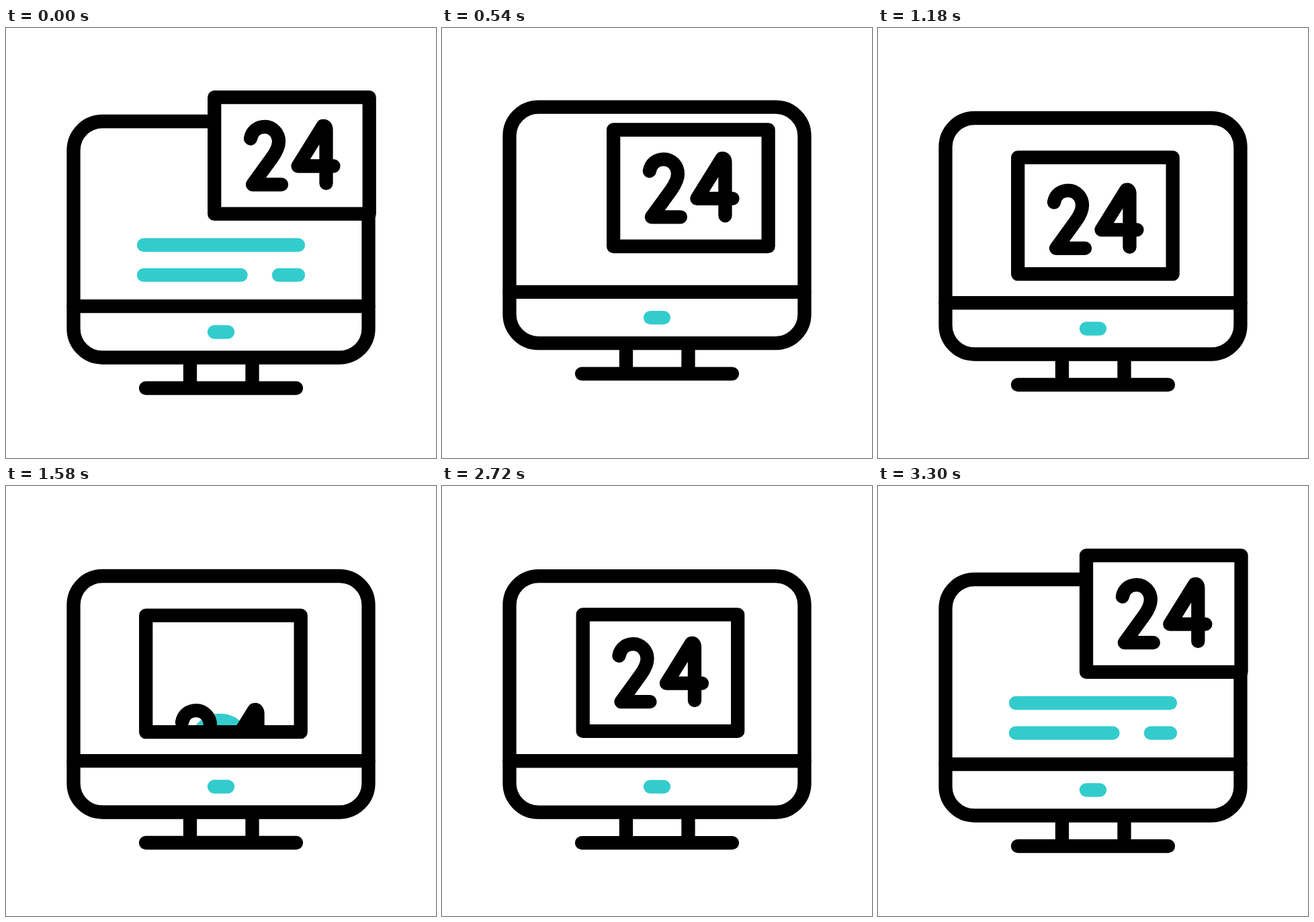
Animation, 640 px wide and 640 px high, one loop 3560 ms. Source, as an HTML page:

```html
<!DOCTYPE html>
<html lang="en">
<head>
<meta charset="utf-8">
<title>Monitor, 24</title>
<style>
  html, body { margin: 0; width: 100%; height: 100%; overflow: hidden; background: #fff; }
  svg { display: block; width: 100%; height: 100%; }
  .ink, .teal { fill: none; stroke: #000; stroke-width: 20.3; stroke-linecap: round; stroke-linejoin: round; }
  .teal { stroke: #3cc; }
</style>
</head>
<body>
<svg viewBox="0 0 640 640">
  <defs>
    <clipPath id="window"><rect x="310" y="103" width="230.5" height="173.5"/></clipPath>
    <g id="rays"></g>
  </defs>

  <g id="monitor" class="ink">
    <path d="M274 491V536M366.5 491V536M208 536H432"/>
    <rect x="100.5" y="139" width="439" height="351.5" rx="43" fill="#fff"/>
    <path d="M100.5 414.2H539.5"/>
    <path class="teal" d="M310 452.5H330"/>
    <g id="textLines" class="teal"></g>
  </g>

  <g id="burst" class="teal">
    <use href="#rays"/>
    <use href="#rays" transform="matrix(-1 0 0 1 651 0)"/>
  </g>

  <g id="card" class="ink">
    <rect x="310.2" y="103.2" width="230.5" height="173.5" fill="#fff" stroke="none"/>
    <g clip-path="url(#window)">
      <g id="person" class="teal">
        <rect x="384.5" y="138" width="72" height="84.5" rx="36"/>
        <path d="M378 300V265A42.5 42.5 0 0 1 463 265V300"/>
      </g>
      <g id="digits">
        <path d="M364 164.5C366 153 375 147 385 147C397 147 406 157 406 169C406 178 401 186 396 193L367 233H410"/>
        <path d="M487.5 205.5H434.5L471.5 146Q476.5 145 476.5 152V231"/>
      </g>
    </g>
    <rect x="310.2" y="103.2" width="230.5" height="173.5"/>
  </g>
</svg>

<script>
const LOOP = 3560, RAY = 26, SWAP = 219;
const el = id => document.getElementById(id);

function addLine(parent, attrs) {
  const line = document.createElementNS('http://www.w3.org/2000/svg', 'line');
  for (const key in attrs) line.setAttribute(key, attrs[key]);
  return parent.appendChild(line);
}

// Easing with handles at (x1, 0) and (x2, 1)
const bezier = (x1, x2) => x => {
  let lo = 0, hi = 1;
  for (let i = 0; i < 24; i++) {
    const u = (lo + hi) / 2, v = 1 - u;
    if (3 * x1 * u * v * v + 3 * x2 * u * u * v + u * u * u < x) lo = u; else hi = u;
  }
  return smooth(lo);
};
const smooth = x => x * x * (3 - 2 * x);
const cardEase = bezier(0.5, 0.5);
const landEase = bezier(0.33, 0.1);

const ramp = (t, from, to, ease = smooth) =>
  ease(Math.min(1, Math.max(0, (t - from) / (to - from))));

const move = (id, x, y) => el(id).setAttribute('transform', `translate(${x} ${y})`);

const textLines = [[205, 435, 323], [205, 349.5, 367.7], [406, 435, 367.7]].map(([x1, x2, y]) =>
  ({ x1, x2, node: addLine(el('textLines'), { x1, x2, y1: y, y2: y }) }));

// Each ray starts at its outer end and points inward
const rays = [[122, 214.5, 15], [144.5, 166, 50], [195, 148, 83]].map(([x, y, angle]) =>
  addLine(el('rays'), { transform: `translate(${x} ${y}) rotate(${angle})` }));

function draw(t) {
  const home = ramp(t, 2675, 3315);

  const lift = -63 * ramp(t, 100, 261) + 58 * ramp(t, 261, 966, landEase) + 5 * home;
  move('monitor', 0, lift);

  const slide = ramp(t, 122, 928, cardEase) - home;
  move('card', -102 * slide, 89.5 * slide);

  const swap = ramp(t, 1080, 2160) - ramp(t, 2160, 2560);
  move('digits', 0, SWAP * swap);
  move('person', 0, SWAP * (1 - swap));

  const shown = 1 - ramp(t, 110, 480) + ramp(t, 2860, 3300);
  el('textLines').style.display = shown > 0 ? '' : 'none';
  for (const { x1, x2, node } of textLines) node.setAttribute('x2', x1 + (x2 - x1) * shown);

  el('burst').style.display = t > 1700 && t < 2165 ? '' : 'none';
  for (const ray of rays) {
    ray.setAttribute('x1', RAY * (1 - ramp(t, 1700, 1960)));
    ray.setAttribute('x2', RAY * (1 - ramp(t, 1960, 2170)));
  }
}

function tick() {
  draw(performance.now() % LOOP);
  requestAnimationFrame(tick);
}
tick();
</script>
</body>
</html>
```
